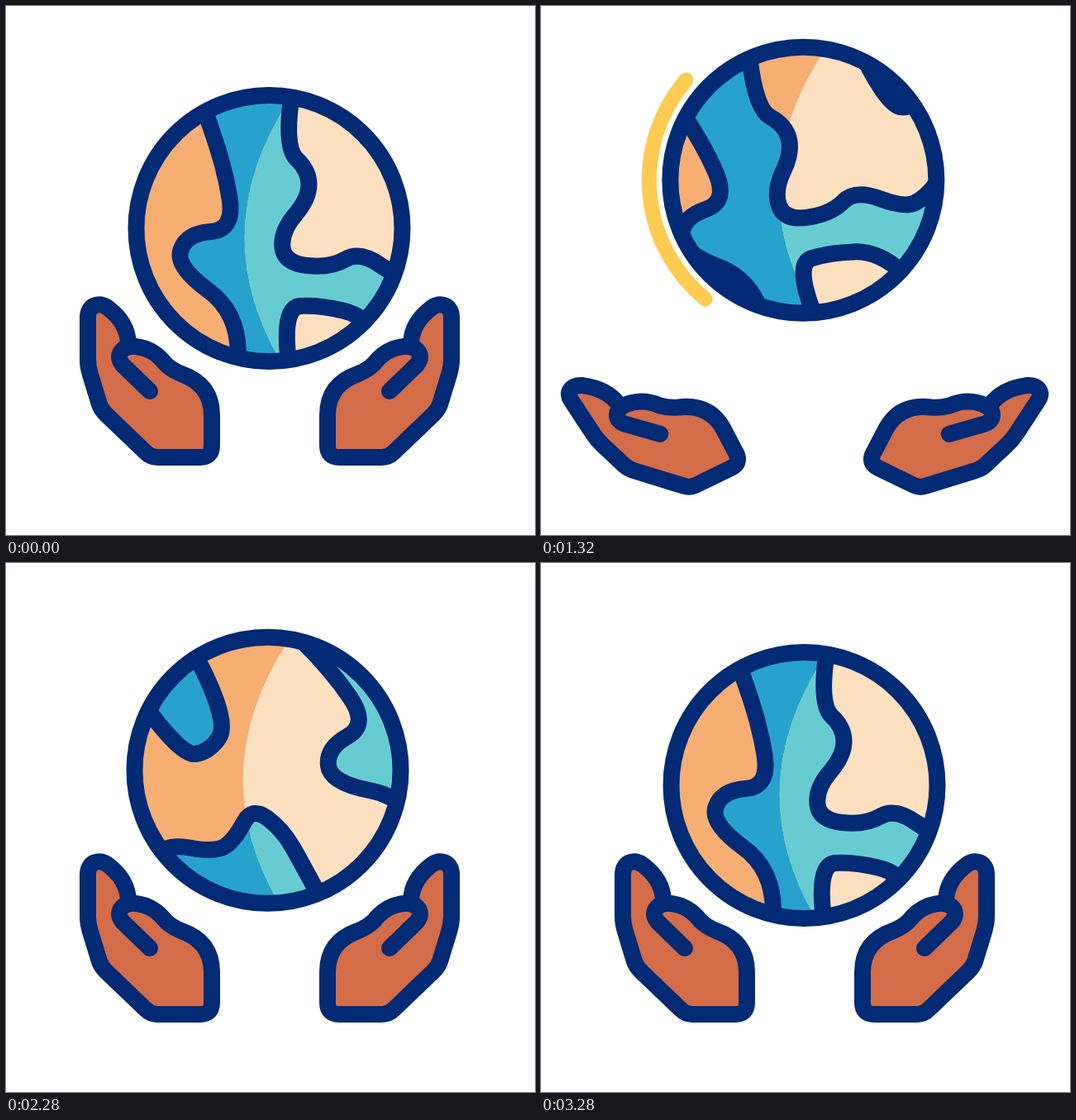
Recreate the animation shown at these times as an HTML page with a canvas. Size 640 by 640 pixels, loop 3.4 s.

```html
<!DOCTYPE html>
<html>
<head>
<meta charset="utf-8">
<style>
html, body { margin: 0; width: 100%; height: 100%; overflow: hidden; background: #fff; }
canvas { display: block; }
</style>
</head>
<body>
<canvas id="c" width="640" height="640"></canvas>
<script>
const ctx = document.getElementById('c').getContext('2d');
const LOOP = 3400, START = 120, APEX = 1690, END = 3280;
const R = 161, MAP_WIDTH = 436, RAD = Math.PI / 180;
const NAVY = '#022a75', SKIN = '#d26c49', YELLOW = '#fdcb52';

const progress = (t, from, to) => Math.min(1, Math.max(0, (t - from) / (to - from)));
const smoothstep = p => p * p * (3 - 2 * p);
const settle = (p, k) => (1 - Math.exp(-k * p)) / (1 - Math.exp(-k));

// Monotone cubic interpolation through [time, value] pairs, at rest at both ends
function track(...keys) {
  const slope = i => (keys[i + 1][1] - keys[i][1]) / (keys[i + 1][0] - keys[i][0]);
  const tangents = keys.map((_, i) => {
    if (i === 0 || i === keys.length - 1) return 0;
    const a = slope(i - 1), b = slope(i);
    return a * b > 0 ? 2 * a * b / (a + b) : 0;
  });
  return t => {
    const i = Math.max(0, keys.findIndex(k => k[0] >= t) - 1);
    const [t0, v0] = keys[i], [t1, v1] = keys[i + 1];
    const h = t1 - t0, u = (t - t0) / h, w = 1 - u;
    return v0 * w * w * (1 + 2 * u) + v1 * u * u * (3 - 2 * u)
      + h * u * w * (w * tangents[i] - u * tangents[i + 1]);
  };
}
const scroll = track([START, 0], [820, -16], [1320, -52], [1940, -150], [2640, -368], [END, -MAP_WIDTH]);

function pose(t) {
  t = Math.min(END, Math.max(START, t));
  const rise = progress(t, START, APEX), fall = progress(t, APEX, END);
  const lift = 51.5 * settle(rise, 10) + 9 * rise;
  const open = 1 - smoothstep(progress(t, APEX, 2270));
  const sway = Math.sin(Math.PI * progress(t, START, END) ** 1.67);
  return {
    x: 318.5 - 2 * sway,
    y: 269 - lift * (1 - settle(fall, 2.9)),
    roll: -25.3 * sway * RAD,
    scroll: scroll(t),
    turn: (24.5 * settle(rise, 10) + 2 * rise) * open,
    lean: 22 * (rise * open) ** 2
  };
}

// Closed curve that uses the points as control points and passes between them
function blob(points) {
  const path = new Path2D(), n = points.length;
  const middle = i => [0, 1].map(k => (points[i % n][k] + points[(i + 1) % n][k]) / 2);
  path.moveTo(...middle(0));
  for (let i = 1; i <= n; i++) path.quadraticCurveTo(...points[i % n], ...middle(i));
  path.closePath();
  return path;
}

const westShore = [[-100, -240], [-88, -170], [-54, -75], [-42, 2], [-100, 6], [-114, 46], [-34, 104], [-42, 220]];
const southShore = [[30, 220], [16, 95], [60, 93], [118, 106], [160, 170], [180, 240]];
const eastShore = [[256, 240], [250, 125], [246, 72], [224, 32], [190, 58], [162, 64], [110, 27], [74, 48],
  [18, 42], [14, 4], [48, -36], [48, -70], [18, -98], [36, -220]];
const sea = blob([...westShore, ...southShore, ...eastShore]);
const gulf = blob([[143, -215], [173, -60], [206, -50], [242, -72], [240, -215]]);

const light = new Path2D('M28 -161Q-80 0 14 161H200V-161Z');
const disc = new Path2D();
disc.arc(0, 0, R, 0, 7);

const HAND = 'M174 466L141 434Q133 424 141 416Q150 408 170 415Q183 420 193 433Q200 440 212 445' +
  'Q249 458 249 495L249 532Q249 546 235 546L183 546Q175 546 169 540L121 494Q115 488 113 482' +
  'L102 446Q99 436 99 428L99 377C99 361 113 358 123 365Q147 383 148 408';

// The hand tips outward around its wrist while the fingers lean further
function handPath({ turn, lean }) {
  const wristX = 178, wristY = 546, scale = 1 - 0.0027 * turn;
  const c = Math.cos(turn * RAD) * scale, s = Math.sin(turn * RAD) * scale;
  const dx = wristX + 0.18 * turn, dy = wristY + 1.38 * turn;
  return new Path2D(HAND.replace(/(\d+) (\d+)/g, (_, x, y) => {
    const v = y - wristY, u = x - wristX - lean * (v / 170) ** 2;
    return `${dx + u * c + v * s} ${dy - u * s + v * c}`;
  }));
}

function drawHands(p) {
  const path = handPath(p);
  ctx.fillStyle = SKIN;
  for (const side of [1, -1]) {
    ctx.save();
    ctx.translate(319, 0);
    ctx.scale(side, 1);
    ctx.translate(-319, 0);
    ctx.fill(path);
    ctx.stroke(path);
    ctx.restore();
  }
}

function drawMap(p, paint) {
  ctx.save();
  ctx.rotate(p.roll);
  ctx.translate(p.scroll, 0);
  for (let i = 0; i < 2; i++) {
    paint(sea);
    paint(gulf);
    ctx.translate(MAP_WIDTH, 0);
  }
  ctx.restore();
}

function drawSurface(p, landColor, seaColor) {
  ctx.fillStyle = landColor;
  ctx.fill(disc);
  ctx.fillStyle = seaColor;
  drawMap(p, shape => ctx.fill(shape));
}

function drawSwoosh(t) {
  const angle = start => (100 + 190 * progress(t, start, start + 380)) * RAD;
  const head = angle(1080), tail = angle(1262);
  if (head <= tail) return;
  ctx.save();
  ctx.beginPath();
  ctx.arc(0, 0, 186.5, tail, head);
  ctx.lineWidth = 18;
  ctx.strokeStyle = YELLOW;
  ctx.stroke();
  ctx.restore();
}

function drawGlobe(p, t) {
  ctx.save();
  ctx.translate(p.x, p.y);
  drawSwoosh(t);
  ctx.save();
  ctx.clip(disc);
  drawSurface(p, '#f6ae73', '#27a2cd');
  ctx.save();
  ctx.clip(light);
  drawSurface(p, '#fce0bf', '#67ccd1');
  ctx.restore();
  drawMap(p, shape => ctx.stroke(shape));
  ctx.restore();
  ctx.stroke(disc);
  ctx.restore();
}

function frame() {
  const t = performance.now() % LOOP, p = pose(t);
  ctx.fillStyle = '#fff';
  ctx.fillRect(0, 0, 640, 640);
  ctx.lineWidth = 20;
  ctx.lineCap = ctx.lineJoin = 'round';
  ctx.strokeStyle = NAVY;
  drawGlobe(p, t);
  drawHands(p);
  requestAnimationFrame(frame);
}
frame();
</script>
</body>
</html>
```
